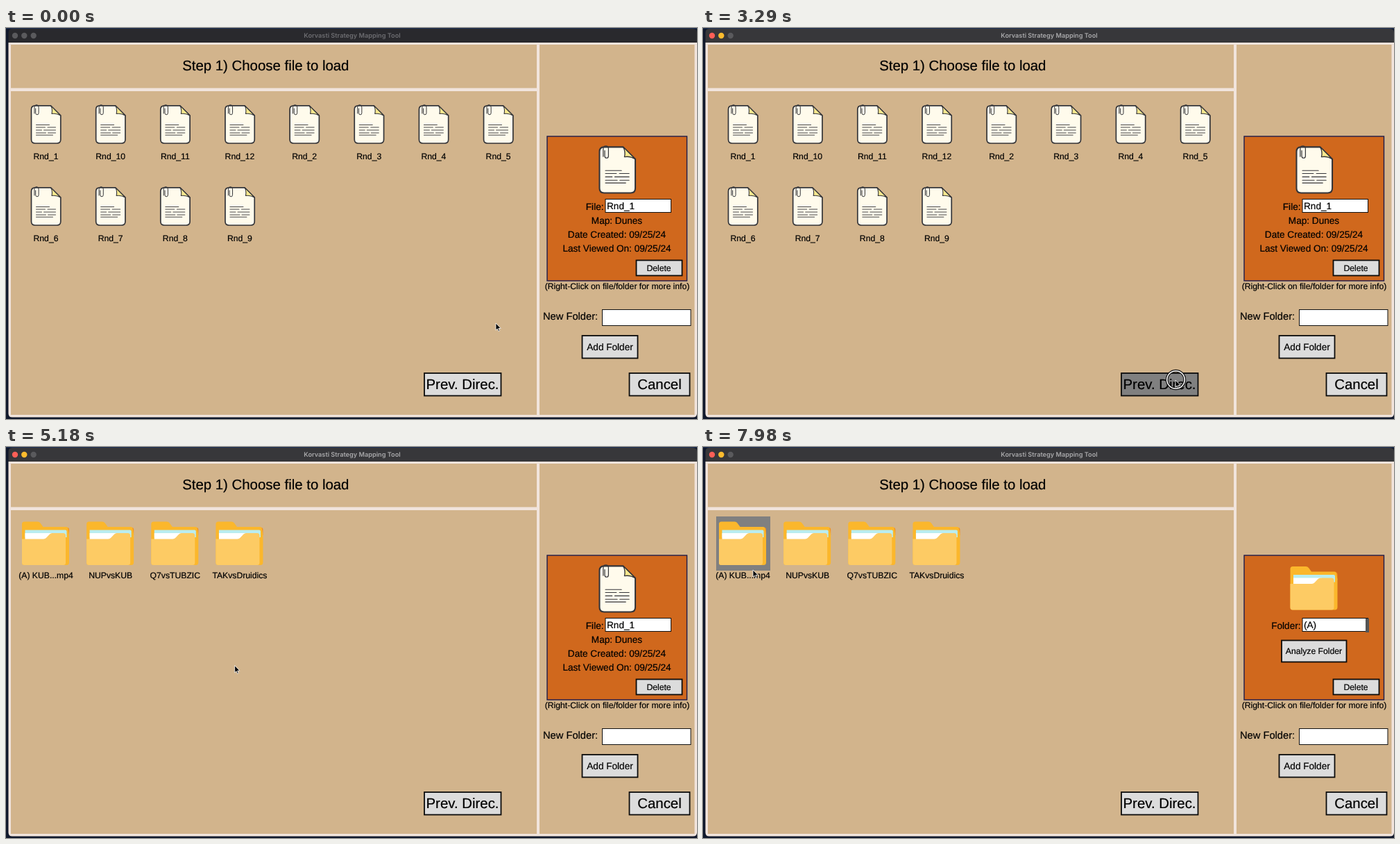
Recreate the animation shown at these times as an HTML page. Size 996 by 563 pixels, loop 8 s.

```html
<!DOCTYPE html>
<html lang="en">
<head>
<meta charset="utf-8">
<title>Strategy Mapping Tool</title>
<style>
  html, body { margin: 0; height: 100%; overflow: hidden; background: #10182b; }
  svg { display: block; width: 100vw; height: 100vh; }
  text {
    font: 12.2px "Liberation Sans", Arial, sans-serif; text-anchor: middle;
    text-rendering: geometricPrecision; stroke: #000; stroke-width: .2;
  }
  .mid { font-size: 13.6px; }
  .big { font-size: 20.4px; }
  .left { text-anchor: start; }
  .right { text-anchor: end; }
  #caption { font: 600 9.2px Inter, sans-serif; fill: #6d6d71; stroke: none; }
  #bar { fill: #29292d; }
  .active #caption { fill: #a9a9ab; }
  .active #bar { fill: #37373a; }
  .active #red { fill: #ff5f57; }
  .active #yellow { fill: #febc2e; }
  .button { fill: #dcdcdc; stroke: #0a0a0a; stroke-width: 1.8; }
  .input { fill: #fff; stroke: #111; }
  .tan { fill: #d2b48c; }
</style>
</head>
<body>
<svg id="stage" viewBox="0 0 996 563">
  <defs>
    <!-- Icons share a 78 x 78 cell -->
    <g id="file" stroke="#34353a" stroke-linejoin="round" stroke-linecap="round">
      <path d="M23.5 11.8H46L60.3 26V60.5Q60.3 66 54.8 66H23.5Q18 66 18 60.5V17.3Q18 11.8 23.5 11.8Z" fill="#fffbec" stroke-width="1.7"/>
      <path d="M46 11.8Q49 17 47.5 23.4Q54.500 22.400 60.3 26Z" fill="#f9e98f" stroke-width="1.1"/>
      <path d="M24.2 16V22.3Q24.2 24.8 26.4 24.8T28.600 22.3V14Q28.6 10.6 25.500 10.6T22.4 14V23" fill="none" stroke-width="1"/>
      <path d="M25 39.5H44M25 43H38M41.5 43H53M25 47H33M36 47H53M25 51H39M42 51H53M25 54.2H49" fill="none" stroke-width=".9"/>
    </g>
    <g id="folder">
      <path d="M67 16H70Q72.5 16 72.5 19V27H67Z" fill="#f4901f"/>
      <path d="M8 7.5H27Q29.5 7.5 31 9.5L35 15H68Q71 15 71 18L72.5 26V66Q72.5 70 69 70H8Q4.5 70 4.5 66.5V11Q4.5 7.5 8 7.5Z" fill="#fbb72c"/>
      <path d="M9 19.5H67Q69 19.5 69 21.5V30H9Z" fill="#b9edf0"/>
      <path d="M9 24H50V34H9Z" fill="#fff"/>
      <path d="M4.5 32.5H35.5Q38 32.5 39.5 30.8L44.5 25.5Q46 24 48 24H64Q67.5 24 67.5 27.5V66.5Q67.5 70 64 70H8Q4.5 70 4.5 66.5Z" fill="#fdcb64"/>
    </g>
  </defs>

  <rect width="996" height="1" fill="#1d3054"/>
  <path d="M3.5 21H996V555Q996 560.5 990 560.5H9Q3.5 560.5 3.5 555Z" fill="#f1e4dc"/>
  <path id="bar" d="M3.5 21V7Q3.5 1 9 1H990Q996 1 996 7V21Z"/>
  <g fill="#5a5a5d">
    <circle id="red" cx="13" cy="11" r="4.2"/>
    <circle id="yellow" cx="26.3" cy="11" r="4.2"/>
    <circle cx="39.7" cy="11" r="4.2"/>
  </g>
  <text id="caption" x="499" y="14">Korvasti Strategy Mapping Tool</text>

  <rect class="tan" x="7" y="24" width="758" height="62.5"/>
  <rect class="tan" x="7" y="91" width="758" height="466"/>
  <rect class="tan" x="769" y="24" width="223.5" height="533"/>
  <text class="big" x="374.3" y="61.2">Step 1) Choose file to load</text>

  <rect id="cell" x="19" y="100" width="78" height="78" fill="#808080"/>
  <g id="files"></g>
  <g id="folders"></g>

  <rect x="780" y="156" width="201.5" height="208" fill="#d0681d" stroke="#1d1b4c" stroke-width="1.4"/>
  <rect class="input" x="864" y="246.5" width="94.5" height="19"/>
  <g id="fileInfo">
    <use href="#file" transform="translate(833.5 157) scale(1.22)"/>
    <text class="mid right" x="861.5" y="261.5">File:</text>
    <text class="mid left" x="866" y="261.2">Rnd_1</text>
    <text class="mid" x="880.5" y="282">Map: Dunes</text>
    <text class="mid" x="880.5" y="302">Date Created: 09/25/24</text>
    <text class="mid" x="880.5" y="322">Last Viewed On: 09/25/24</text>
  </g>
  <g id="folderInfo">
    <use href="#folder" x="842" y="164.5"/>
    <text class="mid right" x="861.5" y="261.5">Folder:</text>
    <text class="mid left" x="866" y="261.2">(A)</text>
    <rect x="955" y="247" width="5" height="20" fill="#555"/>
    <rect class="button" x="834" y="278.5" width="93.5" height="31"/>
    <text x="880.5" y="298.2">Analyze Folder</text>
  </g>
  <rect class="button" x="908.5" y="334.5" width="66" height="22"/>
  <text x="941" y="349.8">Delete</text>
  <text x="881" y="375.8">(Right-Click on file/folder for more info)</text>
  <text class="left" style="font-size:14.7px" x="774" y="420.3">New Folder:</text>
  <rect class="input" x="859.5" y="405.5" width="127.5" height="23"/>
  <rect class="button" x="830.5" y="443" width="80" height="32.5"/>
  <text class="mid" x="870.5" y="464.2">Add Folder</text>
  <rect id="prev" class="button" x="603" y="497" width="110.5" height="32.5"/>
  <text class="big" x="658" y="520.3">Prev. Direc.</text>
  <rect class="button" x="898.5" y="497" width="87" height="32.5"/>
  <text class="big" x="942" y="520.3">Cancel</text>

  <g id="ring" fill="none">
    <circle id="ringEdge" r="12.8" stroke-width="3.8"/>
    <circle r="12.8" stroke="#fff" stroke-width="1.6"/>
  </g>
  <path id="cursor" d="M0 0V10.2L2.3 8.1L3.9 11.7L5.5 11L3.9 7.5H7.2Z" stroke="#fff" stroke-width=".8"/>
</svg>
<script>
const LOOP = 8000, STEP = 70;
const $ = id => document.getElementById(id);

function fillGrid(id, icon, names) {
  $(id).innerHTML = names.map((name, i) => {
    const x = 18.5 + (i % 8) * 93.15, y = 100 + Math.floor(i / 8) * 118;
    return `<use href="#${icon}" x="${x}" y="${y}"/><text x="${x + 39}" y="${y + 88.7}">${name}</text>`;
  }).join('');
}
fillGrid('files', 'file', [1, 10, 11, 12, 2, 3, 4, 5, 6, 7, 8, 9].map(n => 'Rnd_' + n));
fillGrid('folders', 'folder', ['(A) KUB...mp4', 'NUPvsKUB', 'Q7vsTUBZIC', 'TAKvsDruidics']);

// Pointer path: time, x, y
const path = [
  [0, 706, 425], [980, 706, 425], [1050, 704, 425], [1330, 704, 425], [1400, 706, 425],
  [2170, 706, 425], [2240, 702, 437], [2590, 693, 478], [3010, 681, 507],
  [3710, 681, 507], [3920, 675, 487], [4270, 652, 426], [4410, 631, 410],
  [4620, 631, 410], [4760, 530, 377], [4900, 397, 335],
  [5110, 397, 335], [5320, 195, 274],
  [5460, 195, 274], [5670, 95, 208], [5810, 70, 182], [6090, 65, 163],
  [7910, 65, 163], [7980, 72, 177], [LOOP, 72, 177]
];

function pointerAt(t) {
  const i = path.findIndex(p => p[0] > t);
  const [t0, x0, y0] = path[i - 1], [t1, x1, y1] = path[i];
  const k = (t - t0) / (t1 - t0);
  return [x0 + (x1 - x0) * k, y0 + (y1 - y0) * k];
}

const show = (id, on) => $(id).style.display = on ? '' : 'none';
const place = (id, x, y) => $(id).setAttribute('transform', `translate(${x} ${y})`);

function draw(now) {
  const t = Math.floor(now % LOOP / STEP) * STEP;
  const [x, y] = pointerAt(t);
  const inFolders = t >= 3360, folderPicked = t >= 6790;
  const leftClick = t >= 3290 && t < 3570, rightClick = t >= 6720 && t < 6930;

  $('stage').classList.toggle('active', t >= 1190);
  show('files', !inFolders);
  show('folders', inFolders);
  show('fileInfo', !folderPicked);
  show('folderInfo', folderPicked);
  show('cell', inFolders && x > 19 && x < 97 && y > 100 && y < 178);
  $('prev').style.fill = x > 603 && x < 714 && y > 497 && y < 530 ? '#808080' : '';

  show('ring', leftClick || rightClick);
  $('ringEdge').setAttribute('stroke', leftClick ? '#111' : '#20b52b');
  place('ring', x + .5, y - .5);
  place('cursor', x, y);
  requestAnimationFrame(draw);
}
requestAnimationFrame(draw);
</script>
</body>
</html>
```
